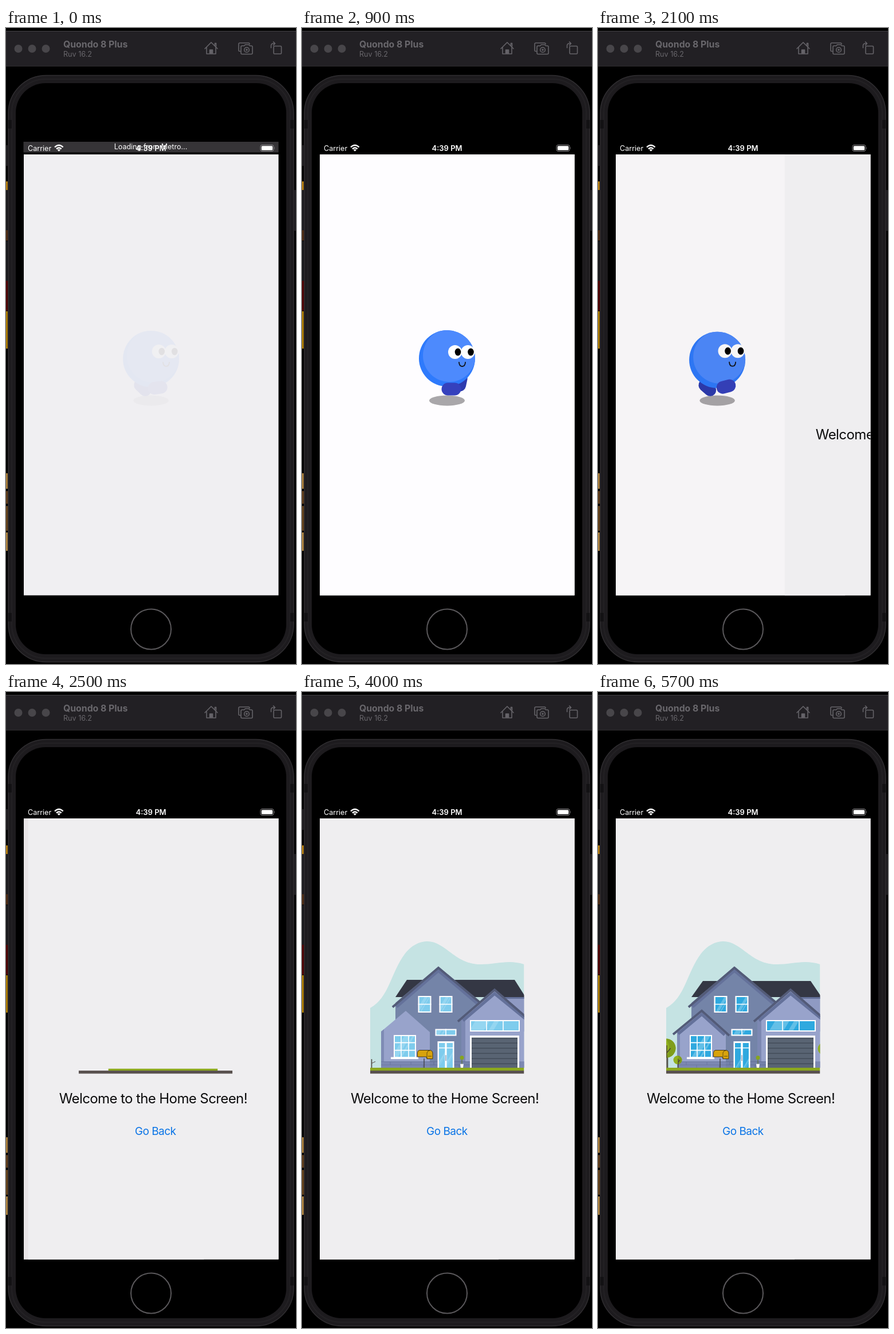
Recreate the animation shown at these times as an HTML page. Size 506 px wide and 1107 px high, loop 5.8 s.

```html
<!DOCTYPE html>
<html lang="en">
<head>
<meta charset="utf-8">
<title>App launch</title>
<style>
  html, body { margin: 0; width: 100%; height: 100%; overflow: hidden; background: #000; }
  svg { display: block; }
  text { font-family: Inter, Roboto, sans-serif; }
  .line { fill: none; stroke: #656368; stroke-width: 1.6; stroke-linejoin: round; stroke-linecap: round; }
  .beam { fill: none; stroke: #535b78; stroke-width: 4; }
  .shade { fill: none; stroke: #64719a; stroke-width: 5; }
  .mull { stroke: #fff; stroke-width: 1.6; fill: none; }
</style>
</head>
<body>
<svg id="stage" width="100%" height="100%" viewBox="0 0 506 1107">
  <defs>
    <clipPath id="screenClip"><rect x="31" y="220" width="444.5" height="767.5"/></clipPath>
    <clipPath id="artClip"><rect x="119" y="420" width="268.5" height="244.5"/></clipPath>
    <clipPath id="bodyClip"><circle id="bodyClipShape" cx="253" r="49"/></clipPath>
    <clipPath id="mainClip"><rect id="mainRise" x="100" y="654" width="300" height="240"/></clipPath>
    <clipPath id="rightClip"><rect id="rightRise" x="100" y="654" width="300" height="240"/></clipPath>
    <clipPath id="leftClip"><rect id="leftRise" x="100" y="654" width="300" height="240"/></clipPath>
  </defs>

  <rect width="506" height="1107"/>
  <g id="edges"></g>

  <!-- Window bar -->
  <rect y="5" width="506" height="62" fill="#222024"/>
  <rect y="5" width="506" height="1" fill="#434145"/>
  <rect y="66" width="506" height="1" fill="#2c2a2d"/>
  <g fill="#48464a"><circle cx="21.5" cy="36" r="7"/><circle cx="45.5" cy="36" r="7"/><circle cx="69.5" cy="36" r="7"/></g>
  <text x="100" y="34" font-size="15.8" font-weight="700" fill="#69676c">Quondo 8 Plus</text>
  <text x="100" y="50" font-size="12.6" fill="#69676c">Ruv 16.2</text>
  <g class="line">
    <path d="M347 36 358 25 369 36M350 34V45H366V34M364.500 30V26.500H366.500V32"/>
    <path d="M355.500 44V38H360.500V44Z" fill="#656368"/>
    <path d="M409 40.500H407.500Q406 40.500 406 39V28Q406 26 408 26H423Q425 26 425 28"/>
    <path d="M412 31H415.500L417.500 29H423.500L425.500 31H428Q430 31 430 33V43.500Q430 45.500 428 45.500H412Q410 45.500 410 43.500V33Q410 31 412 31Z"/>
    <circle cx="420" cy="38" r="4.300"/><circle cx="420" cy="38" r="1"/>
    <rect x="467" y="31.500" width="13.500" height="13.500" rx="1.500"/>
    <path d="M462.500 34.500V31Q462.500 27 466.500 27H469M466.500 24 469.500 27 466.500 30"/>
  </g>

  <!-- Phone -->
  <rect x="4" y="82.500" width="498" height="1021" rx="66" fill="#1d1b1e" stroke="#302e31" stroke-width="1.500"/>
  <rect x="10" y="89" width="486" height="1008" rx="59" fill="none" stroke="#232124" stroke-width="2"/>
  <g fill="#131214"><rect x="4" y="160" width="6" height="15"/><rect x="496" y="160" width="6" height="15"/><rect x="4" y="1018" width="6" height="15"/><rect x="496" y="1018" width="6" height="15"/></g>
  <rect x="17" y="96" width="472" height="994" rx="52"/>
  <circle cx="253" cy="1046.500" r="35" fill="none" stroke="#5a585b" stroke-width="2"/>

  <!-- Status bar -->
  <g id="loading">
    <rect x="30.500" y="198" width="445" height="18.500" fill="#363437"/>
    <text x="252.500" y="211" font-size="12.500" fill="#fff" text-anchor="middle">Loading from Metro...</text>
  </g>
  <text x="38" y="214" font-size="12.600" fill="#fff">Carrier</text>
  <g fill="none" stroke="#fff" stroke-width="2.400">
    <path d="M85 207.500Q92.300 200.500 99.600 207.500M88 210.500Q92.300 206.500 96.600 210.500"/>
    <path d="M89.700 212.200Q92.300 210 94.900 212.200L92.300 214.800Z" fill="#fff" stroke="none"/>
  </g>
  <text x="253" y="214" font-size="13" font-weight="600" fill="#fff" text-anchor="middle">4:39 PM</text>
  <rect x="444" y="203.500" width="23" height="11" rx="3" fill="none" stroke="#8a888b"/>
  <rect x="445.800" y="205.200" width="19.400" height="7.600" rx="1.600" fill="#fff"/>
  <path d="M468.300 207V211Q469.600 209 468.300 207Z" fill="#8a888b"/>

  <!-- App screens -->
  <g clip-path="url(#screenClip)">
    <rect x="31" y="220" width="445" height="768" fill="#f0eff2"/>
    <g id="walkScreen">
      <rect id="white" x="31" y="220" width="445" height="768" fill="#fefdff"/>
      <g id="walker">
        <ellipse id="shadow" cx="253" cy="648.500" ry="9" fill="#a9a7aa"/>
        <rect id="backLeg" x="-17" y="-10.500" width="34" height="21" rx="10.500" fill="#2d3bae"/>
        <circle id="body" cx="253" r="49" fill="#2e7afc"/>
        <g clip-path="url(#bodyClip)"><circle id="belly" cx="257" r="46" fill="#4d8afd"/></g>
        <rect id="frontLeg" x="-17" y="-11" width="34" height="22" rx="11" fill="#3541bd"/>
        <g id="eyes">
          <g fill="#fff"><circle r="12"/><circle cx="22.500" r="12"/></g>
          <ellipse cx="5" rx="5.300" ry="6.400"/><ellipse cx="27.500" rx="5.300" ry="6.400"/>
        </g>
        <path id="mouth" d="M-5.500-2.500Q-5 4.500 0 4.500T5.500-2.500" fill="none" stroke="#111" stroke-width="1.800" stroke-linecap="round"/>
      </g>
    </g>
    <rect id="dim" x="31" y="220" width="445" height="768" fill="#2a0a10"/>

    <g id="homeScreen">
      <rect x="31" y="220" width="445" height="768" fill="#efeef0"/>
      <g clip-path="url(#artClip)">
        <path id="hill" fill="#c5e3e3" d="M119 550C152 532 155 488 180 455C194 438 208 434 219 434C252 435 266 474 312 474C340 474 360 465 387.500 474V654H119Z"/>
        <g id="backRoof">
          <path d="M183 503H371L388 528V531H163Z" fill="#343744"/>
        </g>
        <g id="sideWall"><rect x="350" y="531" width="38" height="60" fill="#8f9ac3"/><rect x="350" y="531" width="38" height="3" fill="#64719a"/></g>

        <g clip-path="url(#mainClip)"><path d="M163 654V541L238 478 311 541V654Z" fill="#7484a8"/></g>
        <g id="mainRoof">
          <path class="shade" id="mainShade" d="M165 548 238 485 308 544"/>
          <path class="beam" d="M158 548.500 238 480 320 548.500"/>
        </g>
        <g id="upperLeft"></g><g id="upperRight"></g><g id="transom"></g>

        <g clip-path="url(#rightClip)">
          <path d="M278 654V570L336 519 388 563V654Z" fill="#98a3cb"/>
          <path d="M278 654V570L285 564V654Z" fill="#7c88b2"/>
          <rect x="278" y="643" width="110" height="11" fill="#7c88b2"/>
        </g>
        <g id="rightRoof"><path class="shade" d="M281 572 336 525 390 569"/><path class="beam" d="M272 573.500 336 518.500 390 565"/></g>
        <g id="garageWindow"></g>
        <g id="garage">
          <rect x="293" y="598" width="86" height="56" fill="#fff"/>
          <rect x="296" y="601.500" width="80" height="52.500" fill="#596473"/>
          <path d="M296 603H376M296 611H376M296 620H376M296 629H376M296 638H376M296 647H376" stroke="#434c59" stroke-width="1.500"/>
        </g>

        <g id="bricks">
          <rect x="138" y="643" width="99" height="11" fill="#7482aa"/>
          <rect x="265" y="643" width="28" height="11" fill="#7482aa"/>
          <path d="M138 643.500H237M138 649H237M265 643.500H293M265 649H293M150 644V649M172 649V654M196 644V649M216 649V654M230 644V649M274 649V654" stroke="#5f6c94" stroke-width=".8"/>
        </g>
        <g id="door">
          <rect x="236.500" y="608" width="29" height="46" fill="#fff"/>
          <g id="doorGlass"></g>
          <path d="M251 632V642" stroke="#687493"/>
        </g>
        <g clip-path="url(#leftClip)">
          <path d="M138 654V591L181 555 223 592V654Z" fill="#98a3cb"/>
          <path d="M138 654V591L143 587V654Z" fill="#7f8bb5"/>
          <rect x="138" y="643" width="85" height="11" fill="#7c88b2"/>
          <path d="M138 643.500H223M138 649H223M154 644V649M172 649V654M190 644V649M211 649V654" stroke="#68759f" stroke-width=".8"/>
        </g>
        <g id="leftRoof"><path class="shade" d="M140 595 181 561 221 597"/><path class="beam" d="M131 596 181 555 229 598"/></g>
        <g id="leftWindow"></g>

        <g id="mailbox">
          <path d="M213 638V654" stroke="#45464f" stroke-width="1.500"/>
          <path d="M205 623.500H223Q228 624 228 629V638.500H218L217 635H201.500V628Q201.500 624 205 623.500Z" fill="#d8a30d" stroke="#4b3a10"/>
          <path d="M218 638V628Q219 624 223 624M220 634H226" fill="none" stroke="#4b3a10" stroke-width=".8"/>
        </g>
        <g id="plant">
          <path d="M279 640V648" stroke="#56702a"/><circle cx="279" cy="636.500" r="3.500" fill="#86a51f"/>
          <path d="M276 647.500H282L281 654H277Z" fill="#fff"/>
        </g>
        <path id="trunk" d="M121.500 654V615M121.500 634 128 626" stroke="#4b4038" stroke-width="1.500"/>
        <g id="trees"></g>
        <rect id="grass" x="119" y="654" width="268.500" height="5" fill="#8ba81e"/>
        <rect id="road" x="119" y="659" width="268.500" height="5.500" fill="#5a5250"/>
      </g>
      <text x="85" y="715.500" font-size="24" letter-spacing="-.6" fill="#0b0b0c">Welcome to the Home Screen!</text>
      <text x="217" y="771" font-size="19" letter-spacing="-.5" fill="#0a74e6">Go Back</text>
    </g>
  </g>
</svg>
<script>
const LOOP = 5800, STEP = 100, GROUND = 654;
const $ = id => document.getElementById(id);
const set = (id, attrs) => { for (const k in attrs) $(id).setAttribute(k, attrs[k]); };
const prog = (t, a, b) => Math.min(1, Math.max(0, (t - a) / (b - a)));
const easeOut = (u, p = 2) => 1 - (1 - u) ** p;
const easeBack = u => 1 + 2.7 * (u - 1) ** 3 + 1.7 * (u - 1) ** 2;

const rect = (x, y, w, h, fill) => `<rect x="${x}" y="${y}" width="${w}" height="${h}" fill="${fill}"/>`;

// A nested svg clips the reflections to its pane.
function glass(x, y, w, h) {
  const s = h * 0.6;
  const band = (a, b) => `<path d="M${a} ${h} ${a + s} 0H${b + s}L${b} ${h}Z" fill="#fff" opacity=".25"/>`;
  return `<svg class="pane" x="${x}" y="${y}" width="${w}" height="${h}">${rect(0, 0, w, h, '#2fa9df')}
    <g class="sheen">${band(w * 0.05, w * 0.35)}${band(w * 0.45, w * 0.55)}</g>
    <g class="glare">${rect(0, 0, w, h, '#bfe9fa')}</g></svg>`;
}

function buildWindow(id, x, y, w, h, cols, rows) {
  let lines = '';
  for (let i = 1; i < cols; i++) lines += `M${x + w * i / cols} ${y}v${h}`;
  for (let i = 1; i < rows; i++) lines += `M${x} ${y + h * i / rows}h${w}`;
  $(id).innerHTML = rect(x, y, w, h, '#fff') + `<g class="fill">${glass(x + 2, y + 2, w - 4, h - 4)}</g>` +
    `<path class="mull" d="${lines || 'M0 0'}"/>`;
}

buildWindow('upperLeft', 202.5, 529, 23, 29, 1, 2);
buildWindow('upperRight', 239.5, 529, 23, 29, 1, 2);
buildWindow('transom', 232.5, 586.5, 37, 12, 2, 1);
buildWindow('garageWindow', 293, 571, 87, 20, 3, 1);
buildWindow('leftWindow', 160, 597, 39, 40, 3, 3);
$('leftWindow').innerHTML += rect(155, 635.5, 48, 3.5, '#fff');
$('doorGlass').innerHTML = glass(239, 611, 10.5, 43) + glass(252.5, 611, 10.5, 43) +
  '<path class="mull" d="M239 619.500H263"/>';

const trees = [[119, 620, 16.5, 4050], [139, 640.5, 7.5, 4300], [394, 621, 10.5, 4450]];
$('trees').innerHTML = trees.map(([x, y, r], i) => `<g id="tree${i}">
  <circle cx="${x}" cy="${y}" r="${r}" fill="#91b01f"/>
  <path d="M${x} ${y - r}a${r} ${r} 0 0 1 0 ${2 * r}q${r * 0.6} ${-r} 0 ${-2 * r}" fill="#7f9d1b"/>
  <path d="M${x + 1} ${GROUND}V${y - r * 0.3}M${x + 1} ${y + r * 0.5}l${r * 0.4} ${-r * 0.5}" stroke="#4b4038" stroke-width="1.300"/></g>`).join('');

$('edges').innerHTML = [
  [0, 204, 3, 36, '#1d1b1e'], [0, 267, 3, 15, '#b07a10'], [0, 282, 4, 70, '#1a191c'], [0, 352, 4, 18, '#4b2a12'],
  [0, 371, 4, 69, '#17171a'], [0, 440, 4, 52, '#4d0203'], [0, 493, 3, 65, '#a87804'], [0, 775, 3, 27, '#a47a3a'],
  [0, 806, 4, 22, '#5e3c1a'], [0, 832, 4, 43, '#63411b'], [0, 878, 3, 32, '#a9803f'], [502, 282, 4, 71, '#1c1b1e']
].map(e => rect(...e)).join('');

function scaleAt(id, x, y, sx, sy) {
  set(id, { transform: `translate(${x} ${y}) scale(${sx} ${sy}) translate(${-x} ${-y})` });
}
function drop(id, t, a, b, dist) {
  const u = prog(t, a, b);
  set(id, { transform: `translate(0 ${-dist * (1 - u)})`, opacity: prog(u, 0, 0.25) });
}
function rise(id, t, a, b, top) {
  set(id, { y: GROUND - (GROUND - top) * easeOut(prog(t, a, b), 1.3) });
}

function drawWalker(t) {
  const a = (t - 400) / 2000 * 2 * Math.PI, c = Math.cos(a), s = Math.sin(a);
  const cy = 578 + c + 3 * Math.cos(2 * a);
  set('body', { cy });
  set('bodyClipShape', { cy });
  set('belly', { cy: cy - 5 });
  set('shadow', { rx: 31 - 0.5 * c });
  set('frontLeg', { transform: `translate(${260.5 + 13.5 * c} ${628.5 - 7.5 * c}) rotate(${-25 * c})` });
  set('backLeg', { transform: `translate(${260 - 18 * c - 17 * -s} ${620.5 + 2.5 * c - 5 * s}) rotate(${-18 + 18 * c - 60 * s})` });
  set('eyes', { transform: `translate(${267 - c} ${564 - 3 * c})` });
  set('mouth', { transform: `translate(279.5 ${584.5 - 0.5 * c})` });

  set('walker', { opacity: Math.min(1, 0.06 + t * 0.00135) });
  set('white', { opacity: prog(t, 0, 800) });
  set('loading', { opacity: 1 - prog(t, 100, 300) });
}

function drawSlide(t) {
  const x = Math.max(0, t - 2000) * 0.012;
  const left = t >= 3000 ? 0 : (1 + x) * Math.exp(-x);
  set('homeScreen', { transform: `translate(${445 * left} 0)`, opacity: t > 2000 ? 1 : 0 });
  set('walkScreen', { transform: `translate(${-133 * (1 - left)} 0)` });
  set('dim', { opacity: 0.1 * (1 - left) });
}

function drawHouse(t) {
  scaleAt('grass', 298, 659, prog(t, 2358, 2558), prog(t, 2400, 2550));
  scaleAt('road', 253, 664, easeOut(prog(t, 2150, 2450)), 1);
  scaleAt('hill', 253, GROUND, 1, easeOut(prog(t, 3050, 4000), 2.5));

  rise('mainRise', t, 2550, 3050, 476);
  rise('rightRise', t, 3230, 3700, 517);
  rise('leftRise', t, 3420, 3850, 553);
  drop('mainRoof', t, 3080, 3560, 26);
  set('mainShade', { opacity: prog(t, 3400, 3700) });
  drop('rightRoof', t, 3600, 3950, 24);
  drop('leftRoof', t, 4020, 4350, 24);
  scaleAt('backRoof', 275, 531, 1, easeBack(prog(t, 3600, 4150)));
  scaleAt('sideWall', 370, 591, 1, easeOut(prog(t, 3600, 3900)));

  const open = prog(t, 3180, 3470);
  scaleAt('upperLeft', 214, 558, open ? 1 : 0, open);
  scaleAt('upperRight', 251, 558, open ? 1 : 0, open * 0.95 + open * open * 0.05);
  const wide = easeOut(prog(t, 3100, 3500));
  scaleAt('transom', 251, 598, wide * 0.7 + wide * wide * 0.3, wide);
  const grow = easeOut(prog(t, 3750, 3950));
  scaleAt('garageWindow', 336, 581, grow, grow);
  const pane = easeOut(prog(t, 3700, 4000));
  scaleAt('leftWindow', 179, 638, pane, pane);
  const lift = prog(t, 3090, 3390);
  scaleAt('garage', 336, GROUND, lift, lift);

  scaleAt('bricks', 138, GROUND, easeOut(prog(t, 2900, 3250)), 1);
  scaleAt('door', 251, GROUND, 1, easeOut(prog(t, 2850, 3200)));
  const post = easeBack(prog(t, 2950, 3250));
  scaleAt('mailbox', 213, GROUND, post, post);
  const sprout = easeBack(prog(t, 3650, 3950));
  scaleAt('plant', 279, GROUND, sprout, sprout);
  scaleAt('trunk', 121.5, GROUND, 1, prog(t, 3850, 4240));
  trees.forEach(([x, , , start], i) => {
    const u = easeBack(prog(t, start, start + 450));
    scaleAt('tree' + i, x, GROUND, u, u);
  });

  const filled = prog(t, 3350, 3650), glare = 0.55 * prog(t, 3700, 3900) * (1 - prog(t, 4000, 4500));
  const shift = 14 * (1 - easeOut(prog(t, 3600, 4900)));
  document.querySelectorAll('.fill').forEach(g => g.setAttribute('opacity', filled));
  document.querySelectorAll('.mull').forEach(g => g.setAttribute('opacity', prog(t, 3500, 3700)));
  document.querySelectorAll('.glare').forEach(g => g.setAttribute('opacity', glare));
  document.querySelectorAll('.sheen').forEach(g => g.setAttribute('transform', `translate(${-shift} 0)`));
}

function draw(t) {
  drawWalker(t);
  drawSlide(t);
  drawHouse(t);
}

const start = performance.now();
function tick(now) {
  const t = Math.max(0, now - start) % LOOP;
  draw(Math.floor(t / STEP) * STEP);
  requestAnimationFrame(tick);
}
draw(0);
requestAnimationFrame(tick);
</script>
</body>
</html>
```
